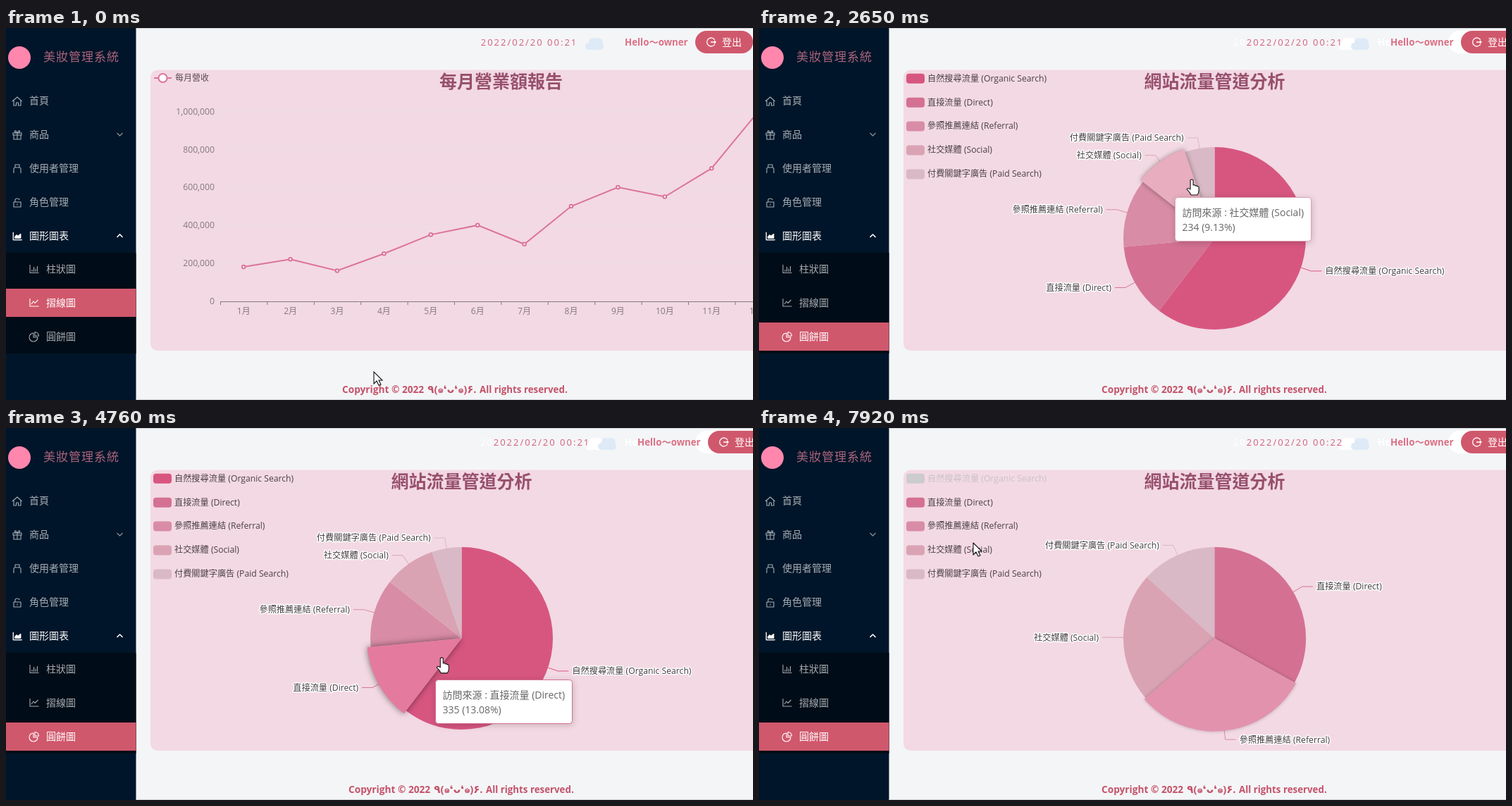
An HTML page with a canvas that plays this animation: 1060x528 px, repeating every 7990 ms.

```html
<!DOCTYPE html>
<html lang="zh-Hant">
<head>
<meta charset="utf-8">
<style>
html, body { margin: 0; width: 100%; height: 100%; overflow: hidden; background: #f4f5f7; }
canvas { display: block; }
</style>
</head>
<body>
<canvas id="stage" width="1060" height="528"></canvas>
<script>
const ctx = document.getElementById('stage').getContext('2d');
const LOOP = 7990, TAU = Math.PI * 2;
const ACCENT = '#d0586c', MUTED = 'rgba(255,255,255,.65)', SIDEBAR = 184.5;
const CLICK_MENU = 870, PAGE_SWAP = 1020, CLICK_LEGEND = 6880, MINUTE = 5300;
const PIE = { x: 646.5, y: 298.5, r: 129.5 };

const slices = [
  { name: '自然搜尋流量 (Organic Search)', value: 1548, rgb: [215, 86, 128] },
  { name: '直接流量 (Direct)', value: 335, rgb: [212, 113, 147] },
  { name: '參照推薦連結 (Referral)', value: 310, rgb: [217, 140, 166] },
  { name: '社交媒體 (Social)', value: 234, rgb: [218, 163, 180] },
  { name: '付費關鍵字廣告 (Paid Search)', value: 135, rgb: [217, 185, 197] },
];
const total = slices.reduce((sum, s) => sum + s.value, 0);

// Pointer path: time, x, y
const pointer = [
  [0, 522, 488], [100, 522, 488], [420, 400, 461], [630, 100, 426], [1750, 100, 426],
  [2500, 420, 285], [2570, 569, 220], [2650, 614, 215], [2900, 640, 205], [3550, 640, 205],
  [3830, 583, 251], [3910, 573, 277], [4250, 573, 292], [4680, 589, 337], [4760, 618, 326],
  [5000, 690, 303], [6150, 690, 303], [6550, 287, 67], [7650, 287, 67], [7920, 304, 163], [LOOP, 304, 163],
];
// Highlighted slice: index, from, to
const hovers = [
  [3, 2530, 2780], [4, 2780, 3620], [3, 3620, 3840], [2, 3840, 4420], [1, 4420, 4860],
  [0, 4860, 6200], [3, 6210, 6290], [0, 6480, CLICK_LEGEND], [1, 7690, 7720], [2, 7860, 8200],
];
const handTimes = [[560, 1800], [2550, 6290], [6500, 7700]];

const icons = {
  home: 'M0 7L7 1L13.5 7M2 6V13H5.5V9H8.5V13H12V6',
  gift: 'M1 4H13V7H1zM2 7V13H12V7M7 4V13M7 4C2 4 3 0 5 1L7 4L9 1C11 0 12 4 7 4',
  user: 'M4 1H10V5H4zM2 13V7Q2 5 4 5H10Q12 5 12 7V13',
  lock: 'M2 6H12V13H2zM4 6V3Q4 1 7 1T10 3M7 8.5V10.5',
  area: 'M1 1V12H13.5V11.5H1.5V1zM3.5 9.500V7L6 4.5L8 6L12 3V9.5z',
  bars: 'M1 1V12.5H13.5M4 11V8M6.5 11V4M9 11V6.5M11.5 11V3',
  line: 'M1 1V12H13.5M3 9L6 5L8 7.5L12.5 3',
  pie: 'M6 2A6 6 0 1 0 12 8H6zM8 .5A5.5 5.5 0 0 1 13.5 6H8z',
  logout: 'M11.8 4A6 6 0 1 0 11.8 10M6 7H13M11 5L13 7L11 9',
  down: 'M0 0L4 4L8 0',
  up: 'M0 4L4 0L8 4',
};
const ARROW = 'M0 0V17L4 13L7 19L10 18L7 12H12Z';
const HAND = 'M-2 1Q0-1 2 1V8Q4 7 5 9Q7 8 8 10Q10 9 10 12V16Q10 19 8 22H-1Q-3 18-7 14Q-6 11-2 14Z';

const clamp = v => Math.max(0, Math.min(1, v));
const lerp = (a, b, k) => a + (b - a) * k;
const cubicOut = k => 1 - (1 - clamp(k)) ** 3;
const cubicInOut = k => (k = clamp(k)) < .5 ? 4 * k ** 3 : 1 - 4 * (1 - k) ** 3;
const within = (t, ranges) => ranges.some(([a, b]) => t >= a && t < b);

function setFont(size, weight = 400) {
  ctx.font = `${weight} ${size}px "Open Sans","Noto Sans CJK TC","Noto Sans TC","Noto Sans CJK JP","DejaVu Sans",sans-serif`;
}
function text(str, x, y, size, color, { align = 'left', weight = 400, spacing = 0, halo = false } = {}) {
  setFont(size, weight);
  ctx.letterSpacing = spacing + 'px';
  ctx.textAlign = align;
  ctx.textBaseline = 'alphabetic';
  if (halo) {
    ctx.strokeStyle = '#fff';
    ctx.lineWidth = 3;
    ctx.lineJoin = 'round';
    ctx.strokeText(str, x, y + size * .36);
  }
  ctx.fillStyle = color;
  ctx.fillText(str, x, y + size * .36);
  ctx.letterSpacing = '0px';
}
function box(x, y, w, h, color, radius = 0) {
  ctx.fillStyle = color;
  ctx.beginPath();
  ctx.roundRect(x, y, w, h, radius);
  ctx.fill();
}
function shape(path, x, y, stroke, fill, width = 1.1) {
  const p = new Path2D(path);
  ctx.save();
  ctx.translate(x, y);
  ctx.lineWidth = width;
  if (fill) { ctx.fillStyle = fill; ctx.fill(p); }
  ctx.strokeStyle = stroke;
  ctx.stroke(p);
  ctx.restore();
}
function circle(x, y, r, fill, stroke) {
  ctx.beginPath();
  ctx.arc(x, y, r, 0, TAU);
  ctx.fillStyle = fill;
  ctx.fill();
  if (stroke) { ctx.strokeStyle = stroke; ctx.stroke(); }
}
function segments(points, color, width) {
  ctx.beginPath();
  points.forEach(([x, y]) => ctx.lineTo(x, y));
  ctx.strokeStyle = color;
  ctx.lineWidth = width;
  ctx.stroke();
}

function pointerAt(t) {
  const i = Math.max(1, pointer.findIndex(p => p[0] >= t));
  const [a, b] = [pointer[i - 1], pointer[i]];
  const k = clamp((t - a[0]) / (b[0] - a[0]));
  return [lerp(a[1], b[1], k), lerp(a[2], b[2], k)];
}
function emphasis(i, t) {
  return clamp(hovers.reduce((sum, [slice, from, to]) => slice === i
    ? sum + cubicOut((t - from) / 300) - cubicOut((t - to) / 300) : sum, 0));
}

function sidebar(t) {
  box(0, 0, SIDEBAR, 528, '#001529');
  circle(19, 42, 16, '#ff86ad');
  text('美妝管理系統', 53, 40.5, 17, '#a9627a', { spacing: 1 });
  [['home', '首頁'], ['gift', '商品'], ['user', '使用者管理'], ['lock', '角色管理'], ['area', '圖形圖表']].forEach(([icon, label], i) => {
    const y = 103 + i * 48, color = i === 4 ? '#fff' : MUTED;
    shape(icons[icon], 9, y - 6, color, i === 4 && color, i === 4 ? .8 : 1.1);
    text(label, 33, y, 14, color);
  });
  shape(icons.down, 157.5, 149, 'rgba(255,255,255,.5)', null, 1.4);
  shape(icons.up, 157.5, 293, '#fff', null, 1.6);
  box(0, 319, SIDEBAR, 143, '#000c17');
  const k = cubicOut((t - CLICK_MENU) / 300);
  [['bars', '柱狀圖', 0], ['line', '摺線圖', 1 - k], ['pie', '圓餅圖', k]].forEach(([icon, label, active], i) => {
    const y = 342 + i * 48;
    ctx.globalAlpha = active;
    box(0, y - 20, SIDEBAR, 40, ACCENT);
    ctx.globalAlpha = 1;
    const color = active > .5 || (i === 2 && t > 600) ? '#fff' : MUTED;
    shape(icons[icon], 33, y - 7, color);
    text(label, 57, y, 14, color);
  });
}

function cloud(x, color) {
  box(x, 21, 26, 10, color, 5);
  circle(x + 11, 20, 6, color);
  circle(x + 18, 21, 7, color);
}

function header(t) {
  const swapped = t >= PAGE_SWAP, dx = swapped ? 18 : 0;
  if (swapped) {
    text('20', 673, 20, 13, '#fff', { spacing: 2 });
    text('He', 878, 20, 13.3, '#fff', { weight: 700 });
    box(978, 4, 82, 32, '#fff', 16);
    cloud(822, '#fff');
  }
  text('2022/02/20 00:2' + (t < MINUTE ? 1 : 2), 673.7 + dx, 20, 13, '#d4607a', { spacing: 2 });
  cloud(822 + dx, '#deeaf6');
  text('Hello～owner', 878 + dx, 20, 13.3, '#dc7186', { weight: 700 });
  box(978 + dx, 4, 82, 32, ACCENT, 16);
  shape(icons.logout, 994 + dx, 13, '#fff', null, 1.3);
  text('登出', 1016 + dx, 20, 14, '#fff');
}

function footer(dx) {
  const color = '#c4536a', bold = { weight: 700 };
  text('Copyright © 2022', 477 + dx, 513, 13.7, color, bold);
  text('٩(๑❛ᴗ❛๑)۶.', 633 + dx, 513, 15, color, { weight: 700, align: 'center' });
  text('All rights reserved.', 672 + dx, 513, 13.3, color, bold);
}

function title(str, x) {
  text(str, x, 75.5, 25, '#97506c', { align: 'center', weight: 700 });
}

function lineChart() {
  const pink = '#db7498', gray = '#85787f', step = 66.4;
  const yOf = v => 387.5 - v * 2.69;
  title('每月營業額報告', 702.5);
  segments([[210, 71], [235, 71]], pink, 2);
  circle(222.5, 71, 6, '#fff', pink);
  text('每月營收', 240, 71, 12, '#5a4a52');
  for (let v = 0; v <= 100; v += 20) {
    text((v * 10000).toLocaleString('en-US'), 296, yOf(v), 12.2, gray, { align: 'right' });
    if (v) segments([[304, yOf(v)], [1060, yOf(v)]], '#ecdce5', 1);
  }
  segments([[304, 388.5], [1060, 388.5]], gray, 1.2);
  const points = [18, 22, 16, 25, 35, 40, 30, 50, 60, 55, 70, 100].map((v, i) => [337.2 + i * step, yOf(v)]);
  points.forEach(([x], i) => {
    segments([[304.5 + i * step, 388], [304.5 + i * step, 393]], gray, 1);
    text(i + 1 + '月', x, 401.5, 12, gray, { align: 'center' });
  });
  segments(points, pink, 2);
  points.forEach(([x, y]) => circle(x, y, 2.3, '#fff', pink));
}

function legend(t) {
  slices.forEach((s, i) => {
    const y = 71.3 + i * 33.9, off = i === 0 && t >= CLICK_LEGEND;
    box(209, y - 6.5, 26, 14, off ? '#cccbcd' : `rgb(${s.rgb})`, 4);
    text(s.name, 239, y, 12.2, off ? '#c9c2c7' : '#4b4046');
  });
}

function wedge(s, from, to, e, alpha) {
  const turn = a => (a - .25) * TAU;
  ctx.save();
  ctx.globalAlpha = alpha;
  ctx.shadowBlur = 10 * e;
  ctx.shadowColor = `rgba(0,0,0,${.5 * e})`;
  ctx.fillStyle = `rgb(${s.rgb.map(v => Math.min(255, v * (1 + .08 * e)))})`;
  ctx.beginPath();
  ctx.moveTo(PIE.x, PIE.y);
  ctx.arc(PIE.x, PIE.y, PIE.r + 5 * e, turn(from), turn(to));
  ctx.fill();
  ctx.restore();
}

function sliceLabel(s, middle, grow) {
  const a = middle * TAU, sin = Math.sin(a), cos = Math.cos(a), side = sin < 0 ? -1 : 1;
  const at = r => [PIE.x + r * sin, PIE.y - r * cos];
  const [x, y] = at(PIE.r + 15);
  ctx.setLineDash([31 * grow, 99]);
  segments([at(PIE.r), [x, y], [x + 15 * side, y]], `rgb(${s.rgb})`, 1);
  ctx.setLineDash([]);
  ctx.globalAlpha = grow;
  text(s.name, x + 20 * side, y, 12.2, '#453d41', { align: side < 0 ? 'right' : 'left', halo: true });
  ctx.globalAlpha = 1;
}

function pieChart(t) {
  const grow = cubicInOut((t - PAGE_SWAP) / 1000);
  const shift = cubicInOut((t - CLICK_LEGEND) / 500);
  const removed = t >= CLICK_LEGEND, first = slices[0].value;
  title('網站流量管道分析', 646.5);
  legend(t);
  let sum = 0;
  const parts = slices.map((s, i) => {
    const angle = v => i ? lerp(v / total, (v - first) / (total - first), shift) : v / total;
    const from = angle(sum), to = angle(sum += s.value);
    return { s, i, from, to, e: emphasis(i, t) };
  });
  parts.forEach(p => { if (p.i || !removed) sliceLabel(p.s, (p.from + p.to) / 2, grow); });
  parts.sort((a, b) => a.e - b.e || a.i - b.i).forEach(p =>
    wedge(p.s, p.from * grow, p.to * grow, p.e, p.i ? 1 : 1 - clamp((t - CLICK_LEGEND) / 200)));
}

function tooltip(t) {
  const alpha = clamp((t - 2545) / 40) * clamp((6400 - t) / 150);
  if (!alpha) return;
  const hover = hovers.filter(h => h[1] <= t).pop();
  const s = slices[hover[0]], heading = '訪問來源 : ' + s.name;
  const [px, py] = pointerAt(t - 80);
  const x = Math.round(px + 20) + .5, y = Math.round(py + 20) + .5;
  setFont(14);
  const w = Math.round(ctx.measureText(heading).width) + 20;
  ctx.save();
  ctx.globalAlpha = alpha;
  ctx.shadowColor = 'rgba(0,0,0,.2)';
  ctx.shadowBlur = 10;
  ctx.shadowOffsetX = 1;
  ctx.shadowOffsetY = 2;
  box(x, y, w, 62, '#fff', 4);
  ctx.shadowColor = 'transparent';
  ctx.strokeStyle = `rgb(${s.rgb})`;
  ctx.lineWidth = 1;
  ctx.stroke();
  text(heading, x + 10, y + 21, 14, '#666');
  text(`${s.value} (${+(s.value / total * 100).toFixed(2)}%)`, x + 10, y + 42, 14, '#666');
  ctx.restore();
}

function draw(t) {
  const swapped = t >= PAGE_SWAP;
  box(0, 0, 1060, 528, '#f4f5f7');
  box(205, 59.5, 900, 398.5, '#f3d9e3', 10);
  header(t);
  swapped ? pieChart(t) : lineChart();
  footer(swapped ? 9 : 0);
  sidebar(t);
  box(SIDEBAR, 0, 876, 1, '#cbcdd1');
  box(SIDEBAR, 527, 876, 1, '#cbcdd1');
  tooltip(t);
  const [x, y] = pointerAt(t);
  shape(within(t, handTimes) ? HAND : ARROW, x, y, '#111', '#fff');
}

function tick() {
  draw(performance.now() % LOOP);
  requestAnimationFrame(tick);
}
tick();
</script>
</body>
</html>
```
